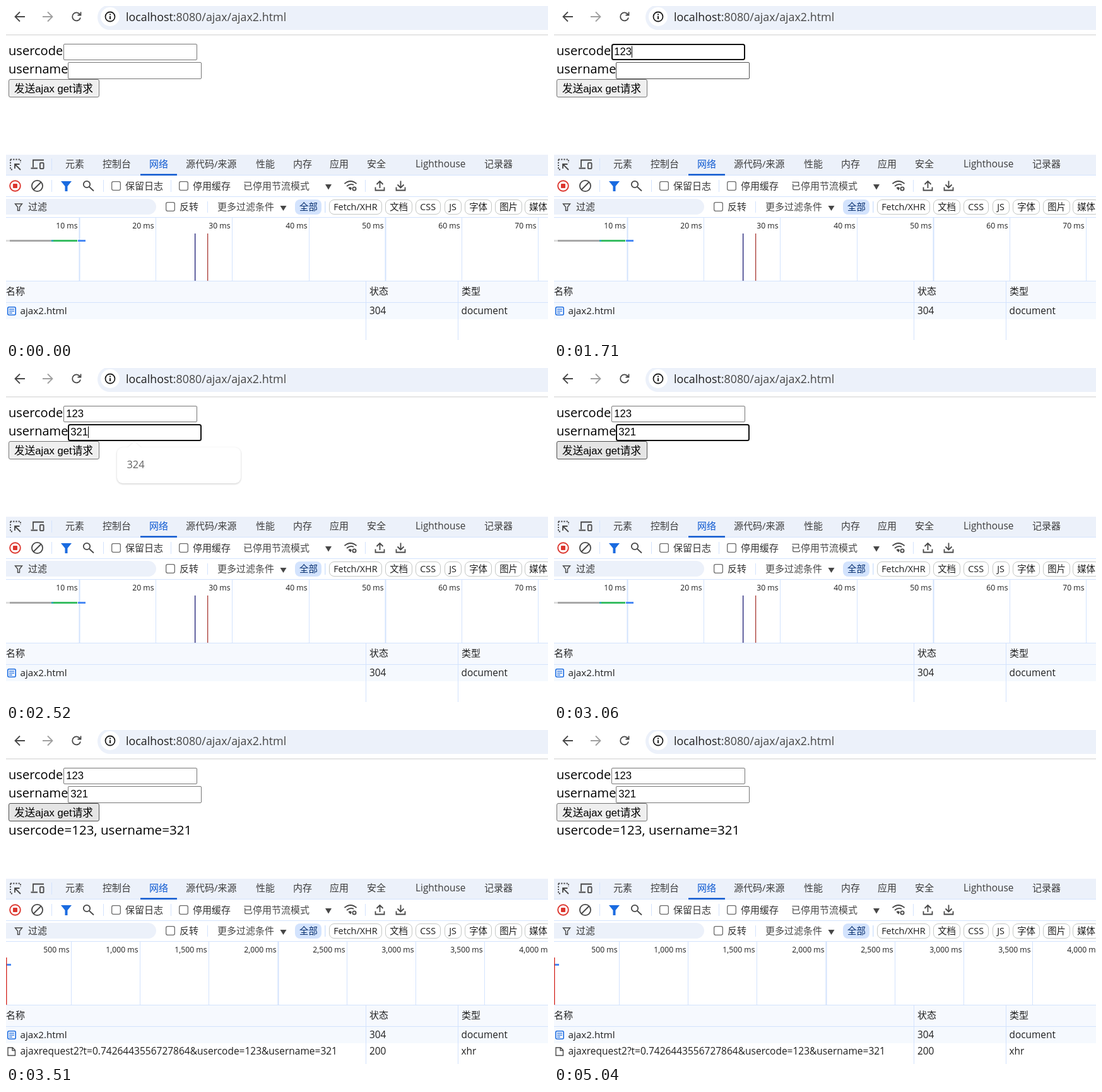
Recreate the animation shown at these times as an HTML page. Size 859x530 px, loop 5670 ms.

```html
<!DOCTYPE html>
<html lang="zh-CN">
<head>
<meta charset="utf-8">
<title>ajax get</title>
<style>
html, body { margin: 0; width: 100%; height: 100%; overflow: hidden; background: #fff; }
svg { display: block; }
text { font-family: "Open Sans", "Noto Sans CJK SC", "Noto Sans CJK", sans-serif; white-space: pre; }
.control { font-family: "Liberation Sans", "Noto Sans CJK SC", "Noto Sans CJK", sans-serif; }
.icon { fill: none; stroke: #474747; stroke-width: 1.8; }
.popup { filter: drop-shadow(0 1.5px 1.5px rgba(0, 0, 0, .3)); }
</style>
</head>
<body>
<svg id="stage" width="859" height="530" viewBox="0 0 859 530">
  <g id="chrome"></g>
  <g id="scene"></g>
</svg>
<script>
const LOOP = 5670;
const BLUE = '#d3e3fd', INK = '#1f1f1f', GREY = '#474747', BAR = '#ecf1fa';

const text = (s, x, y, size = 15, fill = INK, extra = '') =>
  `<text x="${x}" y="${y}" font-size="${size}" fill="${fill}" ${extra}>${s}</text>`;
const rect = (x, y, w, h, fill, extra = '') =>
  `<rect x="${x}" y="${y}" width="${w}" height="${h}" fill="${fill}" ${extra}/>`;
// Rounded box whose outer edge is x, y, w, h.
const box = (x, y, w, h, r, fill, stroke, line = 1) =>
  rect(x + line / 2, y + line / 2, w - line, h - line, fill, `rx="${r}" stroke="${stroke}" stroke-width="${line}"`);
const icon = (d, extra = '') => `<path class="icon" d="${d}" ${extra}/>`;
const solid = (d, fill) => `<path d="${d}" fill="${fill}"/>`;
const vline = (x, y, h, fill = BLUE, w = 1) => rect(x, y, w, h, fill);
const hline = y => rect(0, y, 859, 1, BLUE);
const checkbox = (x, y) => box(x, y, 15, 15, 2.5, '#fff', '#6b6b6b', 1.3);

function addressBar() {
  return rect(145, -2, 760, 40, BAR, 'rx="20"') +
    '<circle cx="165" cy="17" r="15" fill="#fff"/>' +
    icon('M30 17H15M22 9.5L14.5 17L22 24.5') +
    icon('M58 17H73M66 9.5L73.500 17L66 24.500', 'style="stroke:#a0a0a0"') +
    icon('M117.500 14A6.500 6.500 0 1 0 118 18.500M118.500 9.500V14.500H113.500') +
    '<circle class="icon" cx="165" cy="17" r="7.5" style="stroke:#1f1f1f"/>' +
    rect(164, 16, 2, 5, INK) + rect(164, 12.5, 2, 2, INK) +
    text(`localhost<tspan fill="${GREY}">:8080/ajax/ajax2.html</tspan>`, 190, 24, 17.85) +
    rect(0, 45, 859, 1.5, '#dedede');
}

function tabs() {
  const labels = [['元素', 94], ['控制台', 153], ['网络', 227], ['源代码/来源', 285], ['性能', 396],
    ['内存', 455], ['应用', 513], ['安全', 572], ['Lighthouse', 649], ['记录器', 758]];
  return rect(0, 236, 859, 32, BAR) + hline(268) + vline(72, 242, 19) +
    icon('M7 243.500H23V249M7 243.500V259.500H12', 'stroke-dasharray="2.2 2"') +
    icon('M23 260L14.500 251.500M14 258V251H21.500') +
    icon('M60 244.500H43V256M39.500 257.500H50') + box(53, 248, 7.5, 11, 1, 'none', GREY, 1.8) +
    labels.map(([s, x]) => text(s, x, 256, s[0] === 'L' ? 15.4 : 15, s === '网络' ? '#0b57d0' : '#3c3c3c')).join('') +
    rect(213, 266.5, 58, 2.5, '#0b57d0');
}

function toolbar() {
  const arrow = (x, y, tip) => icon(`M${x} ${y}V${tip}M${x - 5} ${tip + Math.sign(y - tip) * 5}L${x} ${tip}L${x + 5} ${tip + Math.sign(y - tip) * 5}M${x - 7} 287.500V292.500H${x + 7}V287.500`);
  return '<circle cx="14.5" cy="285.500" r="8.3" fill="none" stroke="#dc362e" stroke-width="1.9"/>' +
    rect(11, 282, 7, 7, '#dc362e', 'rx="1"') +
    '<circle class="icon" cx="49.5" cy="285.5" r="8.6"/>' + icon('M43.500 291.500L55.500 279.500') +
    solid('M87 278H104L97.500 286V294H93.500V286Z', '#1a6be0') +
    '<circle class="icon" cx="128" cy="283" r="5.2"/>' + icon('M132 287L139 293.500') +
    [72, 87 + 67, 261, 569].map(x => vline(x, 276, 19)).join('') +
    checkbox(167, 278) + text('保留日志', 189, 291, 15, '#333') +
    checkbox(274, 278) + text('停用缓存', 296, 291, 15, '#333') +
    text('已停用节流模式', 376, 291, 15, GREY) + solid('M506 283H516L511 291.500Z', GREY) +
    icon('M536.500 282Q546 274 555.500 282M540 286Q546 281 551 284') + solid('M542.500 288.500L546 292.500L548 289Q546 286 542.500 288.500', GREY) +
    '<circle class="icon" cx="552" cy="290" r="2.6"/>' +
    arrow(592.5, 289, 278) + arrow(625.5, 277.5, 288.5) + hline(302);
}

function filters() {
  const chips = [['Fetch/XHR', 512, 84], ['文档', 601, 43], ['CSS', 649, 40], ['JS', 695, 27],
    ['字体', 727, 43], ['图片', 775, 43], ['媒体', 822, 43]];
  return rect(-14, 306, 252, 25, BAR, 'rx="12.5"') +
    icon('M14.500 314H25.500L21.500 319V324.500H18.500V319Z', 'style="stroke-width:1.4"') +
    text('过滤', 35, 324, 15, '#333') + checkbox(253, 311) + text('反转', 275, 324, 15, '#333') +
    vline(319, 310, 18) + text('更多过滤条件', 335, 324, 15, GREY) + solid('M434.500 317H444.500L439.500 325Z', GREY) +
    rect(458, 307, 42, 24, BLUE, 'rx="8"') + text('全部', 465, 324, 14.4, '#062e6f') +
    vline(505, 310, 18, BLUE, 1.5) +
    chips.map(([s, x, w]) => box(x, 307, w, 24, 7.5, '#fff', '#c4c7c5') + text(s, x + 7.2, 324, 14.4)).join('') +
    hline(335);
}

function table() {
  return rect(0, 437, 859, 33, '#f6f9fe') + rect(0, 471, 859, 26, '#f5f9fe') +
    hline(436) + hline(470) + vline(570, 437, 93) + vline(716, 437, 93) +
    text('名称', 0, 458) + text('状态', 576, 458) + text('类型', 722, 458) +
    box(2, 477, 14, 14, 2, '#fff', '#1a6be0', 1.6) +
    [480.5, 483.5, 486.5].map((y, i) => rect(5, y, i < 2 ? 8 : 5, 1.3, '#1a6be0')).join('') +
    text('ajax2.html', 22.5, 489, 15.2) + text('304', 576, 489, 15.4) + text('document', 721.5, 489, 15.4);
}

function timeline(done) {
  const step = done ? 109.2 : 121.2, first = done ? 103 : 116;
  let out = '';
  for (let i = 0; i < 8; i++) {
    const x = Math.round(first + i * step);
    const label = done ? ((i + 1) * 500).toLocaleString('en-US') : (i + 1) * 10;
    const wide = done ? i === 3 : i % 4 === 0;
    out += vline(wide ? x - .5 : x, 336, 100, BLUE, wide ? 2 : 1) +
      text(label + ' ms', x - 2.5, 353, 12.2, INK, 'text-anchor="end"');
  }
  if (done) return out + rect(0, 371, 8, 3, '#4a8af4') + vline(0, 361, 75, '#d9423c', 1.5);
  return out + rect(0, 371, 6, 3, '#dedede') + rect(6, 371, 66, 3, '#a8a8a8') + rect(72, 371, 3, 3, '#35a9b5') +
    rect(75, 371, 38, 3, '#38bd62') + rect(114, 371, 12, 3, '#4a8af4') +
    vline(299, 361, 75, '#1c1c74', 1.3) + vline(319, 361, 75, '#a83a34', 1.3);
}

function field(x, y, h, value, { focus, hover, caret }) {
  const caretX = Math.round(x + 4.5 + value.length * 9.27);
  return (focus ? box(x, y, 212, h, 2.5, '#fff', '#101010', 2) : box(x, y, 212, h, 1.5, '#fff', hover ? '#4f4f4f' : '#767676')) +
    text(value, x + 4.3, y + 18, 16.67, '#000', 'class="control"') +
    (caret ? vline(caretX, y + 3.5, 18.5, '#000') : '');
}

const BUTTON = { idle: ['#efefef', '#767676'], hover: ['#e5e5e5', '#4f4f4f'], active: ['#f5f5f5', '#8d8d8d'] };
const button = state => box(4, 116, 144, 29, 2.5, ...BUTTON[state]) +
  text('发送ajax get请求', 13, 137, 16.67, '#000', 'class="control"');

function popup(kind, opacity) {
  if (!kind) return '';
  const shape = kind === 'list'
    ? rect(318, 46, 195, 189, '#fff', 'rx="9"') + solid('M319 91L308 101.500L319 113Z', '#fff')
    : rect(176, 126, 196, 57, '#fff', 'rx="9"') + solid('M192 127L203.500 117L215 127Z', '#fff');
  const content = kind === 'list'
    ? solid('M493 46H504Q513 46 513 55V226Q513 235 504 235H493Z', '#efefef') + rect(502, 67, 2, 98, '#858585') +
      ['mudil', '123', 'ilvost', '234'].map((s, i) => text(s, 332.5, 78.500 + i * 45, 16.4)).join('')
    : text('324', 191.5, 159, 16.4);
  return `<g opacity="${opacity}"><g class="popup">${shape}</g>${content}</g>`;
}

const result = () => text('usercode=123, username=321', 4, 166, 20.6, '#000') +
  icon('M3 504H10.500L14.500 508V516.500H3ZM10 504V508.500H14.500', 'style="stroke-width:1.4"') +
  text('ajaxrequest2?t=0.7426443556727864&amp;usercode=123&amp;username=321', 22.5, 515, 15.5) +
  text('200', 576, 515, 15.4) + text('xhr', 721.5, 515, 15.4);

// Each step changes some of the state from its time on.
const steps = [
  [0, { code: '', name: '', focus: '', hover: '', caret: false, popup: '', opacity: 1, button: 'idle', done: false }],
  [450, { hover: 'code' }],
  [540, { focus: 'code', caret: true }],
  [1080, { caret: false }],
  [1260, { code: '1', caret: true }],
  [1350, { code: '12' }],
  [1530, { code: '123' }],
  [1710, { hover: 'name' }],
  [1890, { focus: 'name', popup: 'list', opacity: .6 }],
  [1980, { opacity: 1 }],
  [2160, { name: '3', opacity: .6 }],
  [2250, { popup: 'match', opacity: 1 }],
  [2340, { name: '32' }],
  [2520, { name: '321', opacity: .7 }],
  [2610, { popup: '' }],
  [2700, { hover: '', button: 'hover' }],
  [3060, { caret: false }],
  [3420, { focus: '', button: 'active' }],
  [3510, { button: 'hover', done: true }],
  [4410, { button: 'idle' }],
  [4680, { hover: 'name' }],
  [4950, { hover: 'code' }],
  [5040, { hover: '' }]
];

function draw(s) {
  const flags = id => ({ focus: s.focus === id, hover: s.hover === id, caret: s.caret && s.focus === id });
  return field(91, 60, 26, s.code, flags('code')) + field(98, 89, 27, s.name, flags('name')) +
    button(s.button) + timeline(s.done) + (s.done ? result() : '') + popup(s.popup, s.opacity);
}

document.getElementById('chrome').innerHTML = addressBar() + tabs() + toolbar() + filters() + table() +
  text('usercode', 4, 78, 20.1, '#000') + text('username', 4, 107, 20, '#000');

const scene = document.getElementById('scene');
const start = performance.now();
let shown = -1;
function tick() {
  const t = (performance.now() - start) % LOOP;
  const count = steps.filter(([at]) => at <= t).length;
  if (count !== shown) {
    shown = count;
    scene.innerHTML = draw(Object.assign({}, ...steps.slice(0, count).map(([, change]) => change)));
  }
  requestAnimationFrame(tick);
}
tick();
</script>
</body>
</html>
```
